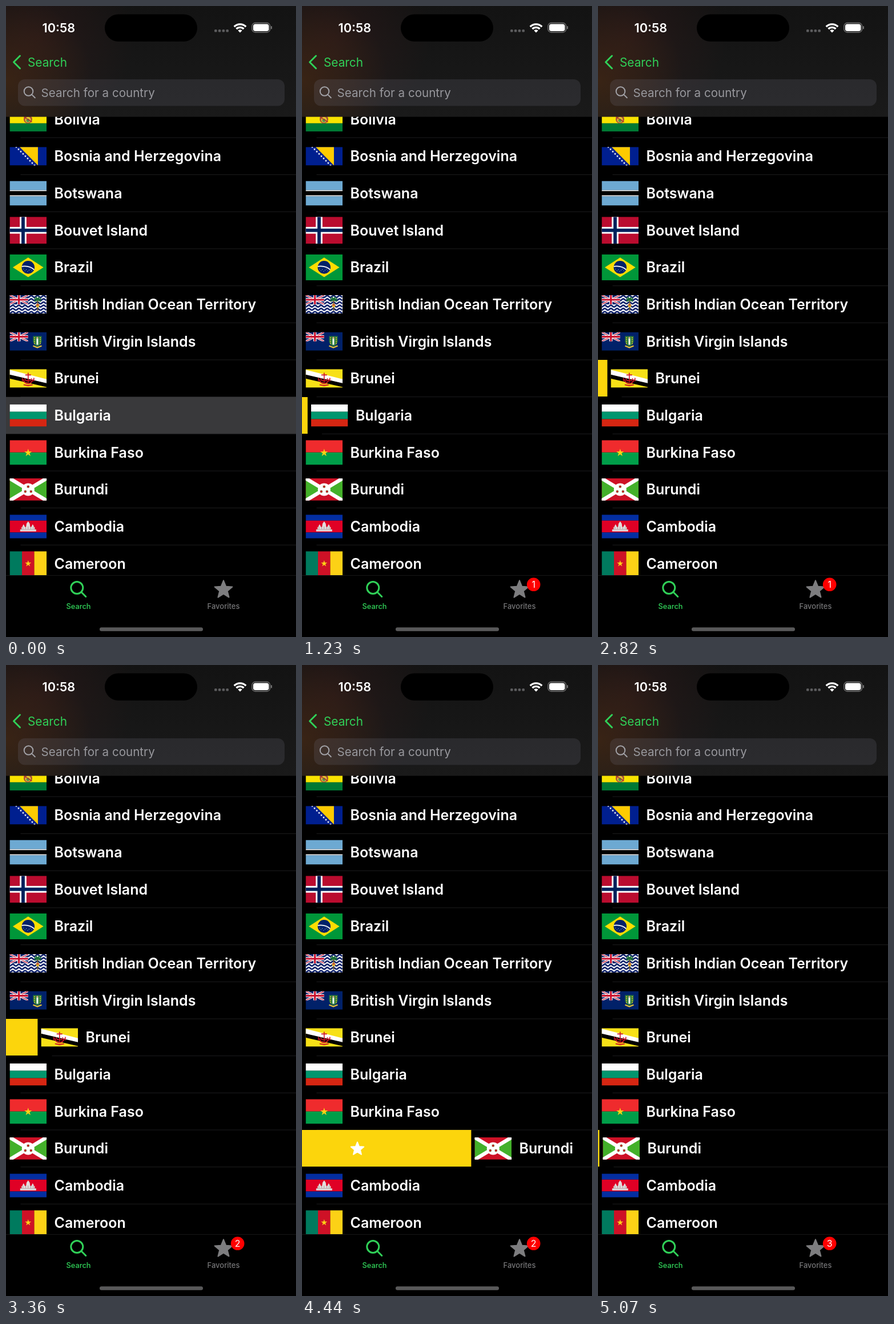
Animation, 508 px wide and 1102 px high, one loop 5130 ms. Source, as an HTML page with a canvas:

```html
<!DOCTYPE html>
<html lang="en">
<head>
<meta charset="utf-8">
<style>
  html, body { margin: 0; width: 100%; height: 100%; overflow: hidden; background: #000; }
  canvas { display: block; width: 508px; height: 1102px; }
</style>
</head>
<body>
<canvas id="stage" width="508" height="1102"></canvas>
<script>
const g = document.getElementById('stage').getContext('2d');
const LOOP = 5130, STEP = 30, WIDTH = 508;
const ROW = 64.67, FIRST_Y = 197.7, LIST_TOP = 193.5, LIST_END = 994;
const FLAG_X = 6.46, W = 64.64;
const GREEN = '#30d158', YELLOW = '#fcd50c';

// ---- drawing helpers ----
function rect(color, x, y, w, h) { g.fillStyle = color; g.fillRect(x, y, w, h); }
function pill(color, x, y, w, h, r) {
  g.fillStyle = color; g.beginPath(); g.roundRect(x, y, w, h, r); g.fill();
}
function disc(color, x, y, r) {
  g.fillStyle = color; g.beginPath(); g.arc(x, y, r, 0, 7); g.fill();
}
function poly(color, ...p) {
  g.fillStyle = color; g.beginPath();
  for (let i = 0; i < p.length; i += 2) g.lineTo(p[i], p[i + 1]);
  g.closePath(); g.fill();
}
function line(color, width, ...p) {
  g.strokeStyle = color; g.lineWidth = width; g.beginPath();
  for (let i = 0; i < p.length; i += 2) i ? g.lineTo(p[i], p[i + 1]) : g.moveTo(p[i], p[i + 1]);
  g.stroke();
}
function star(color, x, y, r, n = 5, inner = 0.42) {
  const p = [];
  for (let i = 0; i < 2 * n; i++) {
    const a = i * Math.PI / n - Math.PI / 2, d = i % 2 ? r * inner : r;
    p.push(x + d * Math.cos(a), y + d * Math.sin(a));
  }
  poly(color, ...p);
}
function roundStar(color, x, y, r) {
  g.lineJoin = 'round';
  star(color, x, y, r, 5, 0.44);
  g.strokeStyle = color; g.lineWidth = 2; g.stroke();
  g.lineJoin = 'miter';
}
function text(s, x, y, size, weight, color, align = 'left') {
  g.font = `${weight} ${size}px Inter, "Liberation Sans", sans-serif`;
  g.textAlign = align; g.fillStyle = color; g.fillText(s, x, y);
}
function lens(color, x, y, r, width, tail) {
  g.strokeStyle = color; g.lineWidth = width; g.lineCap = 'round';
  g.beginPath(); g.arc(x, y, r, 0, 7);
  g.moveTo(x + r * 0.72, y + r * 0.72); g.lineTo(x + tail, y + tail);
  g.stroke(); g.lineCap = 'butt';
}

// ---- flags, drawn from their own top left corner ----
function bands(h, ...pairs) {
  const total = pairs.reduce((sum, p) => sum + p[1], 0);
  let y = 0;
  for (const [color, part] of pairs) { rect(color, 0, y, W, h * part / total); y += h * part / total; }
}
function jack(w, h) {
  g.save();
  g.beginPath(); g.rect(0, 0, w, h); g.clip();
  rect('#12246b', 0, 0, w, h);
  for (const [color, width] of [['#fff', 3.4], ['#c8102e', 1.2]]) {
    line(color, width, 0, 0, w, h); line(color, width, 0, h, w, 0);
  }
  for (const [color, width] of [['#fff', 5.4], ['#c8102e', 3.1]]) {
    line(color, width, w / 2, 0, w / 2, h); line(color, width, 0, h / 2, w, h / 2);
  }
  g.restore();
}
const flags = {
  bolivia(h) {
    bands(h, ['#d52b1e', 1], ['#f9e300', 1], ['#007934', 1]);
    disc('#a7503a', 32, h / 2, 7.5); disc('#e9c62b', 32, h / 2 + 1, 5); disc('#5b8f55', 32, h / 2 + 2, 3);
    line('#b5352b', 1.6, 25, h / 2 - 4, 39, h / 2 + 5);
  },
  bosnia(h) {
    rect('#001f8f', 0, 0, W, h);
    poly('#fecb00', 17.5, 0, 49.5, 0, 49.5, h);
    for (let i = 0; i < 9; i++) star('#fff', 11.5 + i * 4, i * 4, 2.3);
  },
  botswana(h) { bands(h, ['#6da9d2', 9], ['#fff', 1], ['#000', 4], ['#fff', 1], ['#6da9d2', 9]); },
  bouvet(h) {
    const u = W / 22;
    rect('#ba0c2f', 0, 0, W, h);
    rect('#fff', 6 * u, 0, 4 * u, h); rect('#fff', 0, 6 * u, W, 4 * u);
    rect('#00205b', 7 * u, 0, 2 * u, h); rect('#00205b', 0, 7 * u, W, 2 * u);
  },
  brazil(h) {
    const x = W / 2, y = h / 2;
    rect('#009739', 0, 0, W, h);
    poly('#fedd00', 5.5, y, x, 5.5, W - 5.5, y, x, h - 5.5);
    disc('#012169', x, y, 11.3);
    g.save(); g.beginPath(); g.arc(x, y, 11.3, 0, 7); g.clip();
    g.strokeStyle = '#fff'; g.lineWidth = 1.8;
    g.beginPath(); g.arc(x - 6, y + 24, 26, 0, 7); g.stroke();
    g.restore();
    for (let i = 0; i < 7; i++) disc('#9fb0d5', x - 8 + i * 2.4, y + 3 + (i * 3) % 5, 0.6);
  },
  indianOcean(h) {
    rect('#fff', 0, 0, W, h);
    for (let k = 0; k < 6; k++) {
      g.strokeStyle = '#12246b'; g.lineWidth = 2.7; g.beginPath();
      for (let x = 0; x <= W; x++) g.lineTo(x, 2.4 + k * 5.6 + 1.5 * Math.cos(x * Math.PI / 5.4));
      g.stroke();
    }
    jack(W / 2, h / 2);
    line('#6b5a28', 2, 49, 9, 49, 27);
    for (const a of [-2.8, -2.1, -1.1, -0.3, 0.5, 2.6])
      line('#1d7038', 2.4, 49, 8, 49 + 6.5 * Math.cos(a), 8 + 5.5 * Math.sin(a));
    disc('#e2b92c', 49, 18, 3); rect('#c02a35', 47, 16, 4, 2);
  },
  virginIslands(h) {
    rect('#012169', 0, 0, W, h); jack(W / 2, h / 2);
    g.fillStyle = '#2a7a3a'; g.beginPath();
    g.moveTo(41, 7); g.lineTo(56, 7); g.lineTo(56, 17);
    g.quadraticCurveTo(54, 23, 48.5, 25); g.quadraticCurveTo(43, 23, 41, 17); g.fill();
    for (let i = 0; i < 4; i++) { disc('#e6c435', 43.5, 10 + i * 3.3, 1); disc('#e6c435', 53.5, 10 + i * 3.3, 1); }
    rect('#fff', 47, 11, 3, 11); disc('#d6a684', 48.5, 9.8, 1.6);
    line('#e6c435', 2.2, 41, 24, 48.5, 27, 56, 24);
  },
  brunei(h) {
    rect('#f7e017', 0, 0, W, h);
    poly('#fff', 0, 1, W, 17.5, W, 25, 0, 10);
    poly('#000', 0, 9.5, W, 24.5, W, h - 1, 0, 16.5);
    const x = W / 2, y = h / 2, red = '#cf1126';
    g.strokeStyle = red; g.lineWidth = 2;
    g.beginPath(); g.arc(x, y + 1, 8, 0.1, Math.PI - 0.1); g.stroke();
    line(red, 1.6, x, y - 10, x, y + 7);
    line(red, 1.6, x - 5, y - 6, x + 5, y - 6);
    line(red, 1.6, x - 6, y, x - 4, y + 4, x + 4, y + 4, x + 6, y);
    line(red, 2, x - 8, y + 11, x, y + 12.5, x + 8, y + 11);
    line(red, 1.6, x - 10, y - 1, x - 10, y + 5); line(red, 1.6, x + 10, y - 1, x + 10, y + 5);
  },
  bulgaria(h) { bands(h, ['#fff', 1], ['#00966e', 1], ['#d62612', 1]); },
  burkina(h) {
    bands(h, ['#ef2b2d', 1], ['#009e49', 1]);
    star('#fcd116', W / 2, h / 2 + 0.5, 7, 5, 0.38);
  },
  burundi(h) {
    const x = W / 2, y = h / 2;
    rect('#ce1126', 0, 0, W, h);
    poly('#43b02a', 0, 0, x, y, 0, h); poly('#43b02a', W, 0, x, y, W, h);
    line('#fff', 6.4, 0, 0, W, h); line('#fff', 6.4, 0, h, W, 0);
    disc('#fff', x, y, 11);
    for (const [dx, dy] of [[0, -5], [-5, 3.5], [5, 3.5]]) {
      star('#43b02a', x + dx, y + dy, 2.9, 6, 0.6); star('#ce1126', x + dx, y + dy, 2.4, 6, 0.6);
    }
  },
  cambodia(h) {
    bands(h, ['#032ea1', 1], ['#e00025', 2], ['#032ea1', 1]);
    const x = W / 2, y = h / 2, stone = '#e4dcdc';
    rect(stone, x - 14, y + 5, 28, 3.5); rect(stone, x - 11.5, y + 1, 23, 4);
    for (const [dx, top, w] of [[0, -9, 4], [-8, -4, 3], [8, -4, 3]])
      poly(stone, x + dx - w, y + 3, x + dx - w * 0.7, y + top + 4, x + dx, y + top, x + dx + w * 0.7, y + top + 4, x + dx + w, y + 3);
    line('#a08f91', 0.7, x - 13, y + 5, x + 13, y + 5);
    for (let i = -2; i <= 2; i++) rect('#a08f91', x + i * 4.5 - 0.4, y, 0.8, 4.5);
  },
  cameroon(h) {
    ['#007a5e', '#ce1126', '#fcd116'].forEach((c, i) => rect(c, i * W / 3, 0, W / 3 + 0.2, h));
    star('#fcd116', W / 2, h / 2, 5.8, 5, 0.38);
  }
};
const rows = [
  ['Bolivia', 'bolivia', 43], ['Bosnia and Herzegovina', 'bosnia', 32.3],
  ['Botswana', 'botswana', 43], ['Bouvet Island', 'bouvet', 47],
  ['Brazil', 'brazil', 45.2], ['British Indian Ocean Territory', 'indianOcean', 32.3],
  ['British Virgin Islands', 'virginIslands', 32.3], ['Brunei', 'brunei', 32.3],
  ['Bulgaria', 'bulgaria', 38.8], ['Burkina Faso', 'burkina', 43],
  ['Burundi', 'burundi', 38.8], ['Cambodia', 'cambodia', 41.4], ['Cameroon', 'cameroon', 43]
];

// ---- motion ----
// Monotone cubic through [time, value] points.
function curve(points, t) {
  const n = points.length - 1;
  if (t <= points[0][0]) return points[0][1];
  if (t >= points[n][0]) return points[n][1];
  const slope = i => (points[i + 1][1] - points[i][1]) / (points[i + 1][0] - points[i][0]);
  const tangent = i => {
    if (i === 0 || i === n) return 0;
    const a = slope(i - 1), b = slope(i);
    return a * b <= 0 ? 0 : 2 * a * b / (a + b);
  };
  let i = 0;
  while (t > points[i + 1][0]) i++;
  const [t0, v0] = points[i], [t1, v1] = points[i + 1], d = t1 - t0, u = (t - t0) / d;
  return v0 + (v1 - v0) * u * u * (3 - 2 * u)
    + d * u * (1 - u) * (tangent(i) * (1 - u) - tangent(i + 1) * u);
}
const DRAG = [[0, 0], [90, 16], [210, 296], [270, 325], [330, 268], [450, 165], [630, 55], [840, 2], [930, 0]];
const ICON = [[90, 20], [150, 54], [210, 97], [270, 126], [330, 112], [450, 72], [630, 26]];
const RELEASE = 300;
const swipes = [{ row: 8, start: 450 }, { row: 7, start: 2730 }, { row: 10, start: 4230 }];

function drawRow(i, t) {
  const [name, flag, h] = rows[i], cy = FIRST_Y + i * ROW, top = cy - ROW / 2;
  const swipe = swipes.find(s => s.row === i);
  const off = swipe ? curve(DRAG, t - swipe.start) : 0;
  if (i === 8 && t < swipes[0].start) rect('#39393b', 0, top, WIDTH, ROW);
  if (off > 0) {
    rect(YELLOW, 0, Math.round(top), off + 0.4, 64);
    g.globalAlpha = Math.min(1, Math.max(0, (off - 60) / 40));
    roundStar('#fff', curve(ICON, t - swipe.start), cy + 0.8, 11.8);
    g.globalAlpha = 1;
  }
  g.save();
  g.translate(off, 0);
  text(name, 84.5, cy + 9, 25, 600, '#fff');
  rect('#1d1d1e', 25.5, top + ROW - 0.6, WIDTH, 1);
  g.translate(FLAG_X, cy - h / 2);
  g.beginPath(); g.rect(0, 0, W, h); g.clip();
  flags[flag](h);
  g.restore();
}

function glow(x, y, r, rgb, alpha) {
  const grad = g.createRadialGradient(x, y, 0, x, y, r);
  grad.addColorStop(0, `rgba(${rgb},${alpha})`);
  grad.addColorStop(1, `rgba(${rgb},0)`);
  g.fillStyle = grad; g.fillRect(0, 0, WIDTH, LIST_TOP);
}

function drawHeader() {
  const shade = g.createLinearGradient(0, 0, 0, LIST_TOP);
  shade.addColorStop(0, '#131313'); shade.addColorStop(1, '#1a1a1a');
  g.fillStyle = shade; g.fillRect(0, 0, WIDTH, LIST_TOP);
  glow(0, 130, 150, '100,55,12', 0.38);
  glow(55, 55, 170, '85,35,32', 0.26);

  text('10:58', 63.5, 46, 21.7, 600, '#fff');
  pill('#000', 173, 14.5, 162, 47.5, 23.7);
  for (let i = 0; i < 4; i++) pill('#5c5c5e', 365 + i * 6.8, 41, 4.6, 4.6, 1.5);

  g.save();
  g.beginPath(); g.moveTo(410, 46.5); g.lineTo(394, 30.5); g.lineTo(394, 20);
  g.lineTo(426, 20); g.lineTo(426, 30.5); g.closePath(); g.clip();
  disc('#fff', 410, 46.5, 5.2);
  g.strokeStyle = '#fff'; g.lineWidth = 3.4;
  for (const r of [9.1, 14.6]) { g.beginPath(); g.arc(410, 46.5, r, 0, 7); g.stroke(); }
  g.restore();

  g.strokeStyle = '#777'; g.lineWidth = 1.3;
  g.beginPath(); g.roundRect(431, 29.5, 31.5, 16.5, 5.5); g.stroke();
  pill('#fff', 433, 31.5, 27.5, 12.5, 3.8);
  pill('#777', 464, 35, 2, 5.5, 1);

  g.lineCap = g.lineJoin = 'round';
  line(GREEN, 3, 24.5, 87, 13.5, 98, 24.5, 109);
  g.lineCap = 'butt'; g.lineJoin = 'miter';
  text('Search', 38, 105.5, 20.8, 400, GREEN);
  pill('rgba(118,118,128,0.2)', 21, 128, 467, 46.5, 12);
  lens('#a2a2a7', 39.5, 149, 7.8, 2, 11.3);
  text('Search for a country', 61.5, 159, 20.6, 400, '#98989d');
}

function drawTabs(count) {
  rect('#000', 0, LIST_END, WIDTH, 108);
  rect('#171717', 0, LIST_END, WIDTH, 1);
  lens(GREEN, 124.3, 1016, 10.5, 3, 15.5);
  text('Search', 127, 1053, 12.8, 500, GREEN, 'center');
  roundStar('#7d7d7f', 381, 1019.5, 16.2);
  text('Favorites', 381, 1053, 13, 500, '#757577', 'center');
  if (count) {
    disc('#fe0000', 405.7, 1010.3, 11.8);
    text(count, 405.7, 1016, 16, 400, '#fff', 'center');
  }
  pill('#59595a', 164, 1085.3, 181, 6.4, 3.2);
}

function draw(t) {
  rect('#000', 0, 0, WIDTH, 1102);
  rows.forEach((_, i) => drawRow(i, t));
  drawHeader();
  drawTabs(swipes.filter(s => t >= s.start + RELEASE).length);
}

function tick() {
  const t = performance.now() % LOOP;
  draw(Math.floor(t / STEP) * STEP);
  requestAnimationFrame(tick);
}
tick();
</script>
</body>
</html>
```
